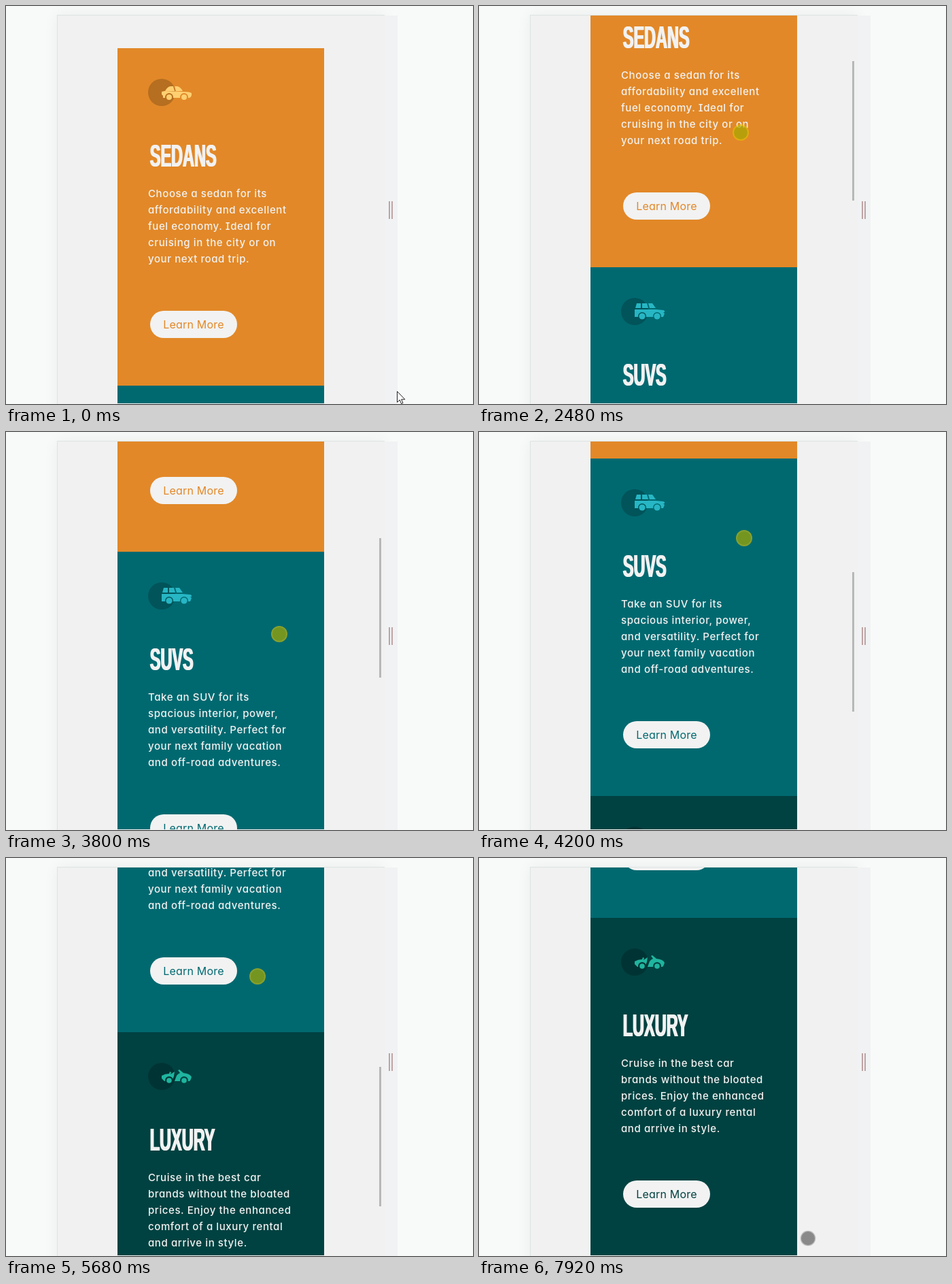
Recreate the animation shown at these times as an HTML page. Size 687 by 585 pixels, loop 7.99 s.

```html
<!DOCTYPE html>
<html lang="en">
<head>
<meta charset="utf-8">
<title>Car cards, mobile scroll</title>
<style>
  html, body { margin: 0; width: 100%; height: 100%; overflow: hidden; background: #f8faf9; }
  #stage { position: relative; width: 687px; height: 585px; overflow: hidden; }
  #stage div, #stage svg { position: absolute; }
  #device { left: 75px; top: 13px; width: 481px; height: 600px; background: #f1f1f1;
    border: solid #dce4e2; border-width: 1px 0 0 1px; box-shadow: 0 0 20px rgba(0,0,0,.06); }
  #rail { left: 557px; top: 14px; width: 19px; height: 571px; background: #f1f2f3; }
  .grip { top: 287px; width: 2px; height: 26px; background: #c0a3a3; }
  .hover .grip { background: #8d7474; }
  #view { left: 76px; top: 14px; width: 476px; height: 570px; overflow: hidden; }
  #page { left: 88px; top: 48px; width: 304px; }
  .card { width: 304px; height: 496px; background: var(--bg); color: #f2f2f2;
    font-family: Inter, Lato, sans-serif; font-feature-settings: "cv11", "cv08"; }
  .card svg { left: 45px; top: 45px; overflow: visible; }
  .card h2 { position: absolute; margin: 0; left: 47px; top: 134px;
    font: bold 47px/47px "Liberation Sans", Arial, sans-serif; white-space: nowrap;
    transform: scaleX(.5); transform-origin: 0 0; text-shadow: 3px 0 currentColor; }
  .card p { position: absolute; margin: 0; left: 45px; top: 202px; white-space: pre;
    font-size: 15px; line-height: 24px; font-weight: 500; letter-spacing: .6px; }
  .button { left: 48px; top: 386px; width: 128px; height: 40px; border-radius: 20px;
    background: #f2f2f2; color: var(--bg); font-size: 16px; line-height: 40px;
    letter-spacing: .2px; text-align: center; white-space: nowrap; }
  #thumb { left: 549px; top: 0; width: 3px; height: 205px; background: #b6b7b7; }
  #touch { left: -12px; top: -12px; width: 24px; height: 24px; }
  #arrow { left: 0; top: 0; overflow: visible; }
</style>
</head>
<body>
<div id="stage">
  <div id="device"></div>
  <div id="rail"></div>
  <div class="grip" style="left:563px"></div>
  <div class="grip" style="left:567px"></div>
  <div id="view"><div id="page"></div></div>
  <div id="thumb"></div>
  <svg id="touch" viewBox="-12 -12 24 24"><circle id="ring"/><circle id="core" r="10"/></svg>
  <svg id="arrow" width="13" height="20">
    <path d="M.5.5V16.5L4.2 13 6.6 18.6 9 17.5 6.6 12.2H11.8Z" fill="#fff" stroke="#222"/>
  </svg>
  <svg width="0" height="0">
    <mask id="arches" maskUnits="userSpaceOnUse" x="-5" y="-20" width="60" height="40">
      <rect x="-5" y="-20" width="60" height="40" fill="#fff"/>
      <circle cx="11" cy="7" r="6"/><circle cx="33" cy="7" r="6"/>
    </mask>
  </svg>
</div>
<script>
const LOOP = 7990, CARD_HEIGHT = 496;
const $ = id => document.getElementById(id);

const cards = [
  { title: 'SEDANS', bg: '#e28828', disc: '#b66e20', tint: '#ffcf70', wheel: 4, lift: 0,
    shape: 'M5-2Q9-9 13-9H17L19-2ZM19-9H23Q28-8 31-2H21ZM0-1L4-2 31-1Q42-1 44 1V4Q43 8 40 8H2V5L0 3Z',
    text: 'Choose a sedan for its\naffordability and excellent\nfuel economy. Ideal for\ncruising in the city or on\nyour next road trip.' },
  { title: 'SUVS', bg: '#006970', disc: '#00545a', tint: '#27b6c4', wheel: 4.6, lift: 0,
    shape: 'M1-5L3-12H9V-5ZM11-12H18L20-5H11ZM20-12H26L31-5H22ZM0-3H31L42-2 44-1V1H42L44 3 42 8H0Z',
    text: 'Take an SUV for its\nspacious interior, power,\nand versatility. Perfect for\nyour next family vacation\nand off-road adventures.' },
  { title: 'LUXURY', bg: '#004241', disc: '#003434', tint: '#1fb59f', wheel: 3.8, lift: -1,
    shape: 'M0 0Q5-3 11-3L12-6 14-5 13-2 19-6 18 1 15 8H4L0 4ZM19 8L22 0Q24-3 27-4L24-8 26-9 32-4Q42-3 44 2 43 6 41 8Z',
    text: 'Cruise in the best car\nbrands without the bloated\nprices. Enjoy the enhanced\ncomfort of a luxury rental\nand arrive in style.' }
];

$('page').innerHTML = cards.map((c, i) => `
  <div class="card" style="--bg:${c.bg};top:${i * CARD_HEIGHT}px">
    <svg width="64" height="40" viewBox="-20 -20 64 40">
      <circle r="20" fill="${c.disc}"/>
      <g fill="${c.tint}" transform="translate(0 ${c.lift})">
        <path d="${c.shape}" mask="url(#arches)"/>
        <circle cx="11" cy="7" r="${c.wheel}"/><circle cx="33" cy="7" r="${c.wheel}"/>
      </g>
    </svg>
    <h2>${c.title}</h2><p>${c.text}</p><div class="button">Learn More</div>
  </div>`).join('');

// Each key is [time, value, ...]
const pointer = [
  [70, 575, 566], [330, 470, 455], [590, 384, 395], [1080, 384, 395], [1600, 384, 273],
  [1800, 384, 225], [2380, 384, 225], [2720, 386, 95], [2800, 388, 95], [3100, 417, 425],
  [3270, 414, 439], [3400, 414, 439], [4200, 390, 156], [4400, 388, 122], [4500, 389, 122],
  [4960, 395, 430], [5120, 395, 430], [5680, 370, 174], [5800, 368, 150], [5860, 368, 150],
  [6160, 366, 420], [6240, 366, 420], [6580, 358, 296], [6740, 356, 217], [6900, 358, 220],
  [7500, 473, 534], [7920, 484, 559]
];
const scrolling = [
  [1080, 0], [1200, 10], [1600, 89], [1800, 142], [2380, 142], [2780, 268], [2900, 273],
  [3420, 273], [3560, 300], [4200, 519], [4420, 557], [5120, 557], [5230, 585],
  [5680, 798], [5860, 822], [6240, 822], [6580, 966]
];
const thumbAlpha = [
  [1100, 0], [1120, 1], [2100, 1], [2270, 0], [2390, 0], [2410, 1], [7000, 1], [7300, 0]
];
const presses = [[980, 2760], [3270, 4460], [5060, 5840], [6200, 6860]];

function sample(keys, t) {
  const next = keys.findIndex(k => k[0] > t);
  if (next < 0) return keys[keys.length - 1].slice(1);
  if (next === 0) return keys[0].slice(1);
  const a = keys[next - 1], b = keys[next], u = (t - a[0]) / (b[0] - a[0]);
  return a.slice(1).map((v, i) => v + (b[i + 1] - v) * u);
}

const place = (el, x, y) => el.style.transform = `translate(${x}px,${y}px)`;

function render(t) {
  const [x, y] = sample(pointer, t).map(Math.round);
  const scroll = Math.round(sample(scrolling, t)[0]);
  const held = presses.some(([from, to]) => t >= from && t < to);
  const outside = x > 552;

  place($('page'), 0, -scroll);
  place($('thumb'), 0, Math.round(17.6 + scroll * .3628));
  $('thumb').style.opacity = sample(thumbAlpha, t)[0];
  $('stage').className = x > 557 && x < 575 ? 'hover' : '';

  $('arrow').style.display = outside ? '' : 'none';
  $('touch').style.display = outside ? 'none' : '';
  place($('arrow'), x, y);
  place($('touch'), x, y);
  $('ring').setAttribute('r', held ? 12 : 11.3);
  $('ring').setAttribute('fill', held ? 'rgba(225,196,0,.6)' : 'rgba(0,0,0,.22)');
  $('core').setAttribute('fill', held ? 'rgba(60,120,0,.25)' : 'rgba(0,0,0,.27)');
}

const start = performance.now();
function frame() {
  render((performance.now() - start) % LOOP);
  requestAnimationFrame(frame);
}
frame();
</script>
</body>
</html>
```
